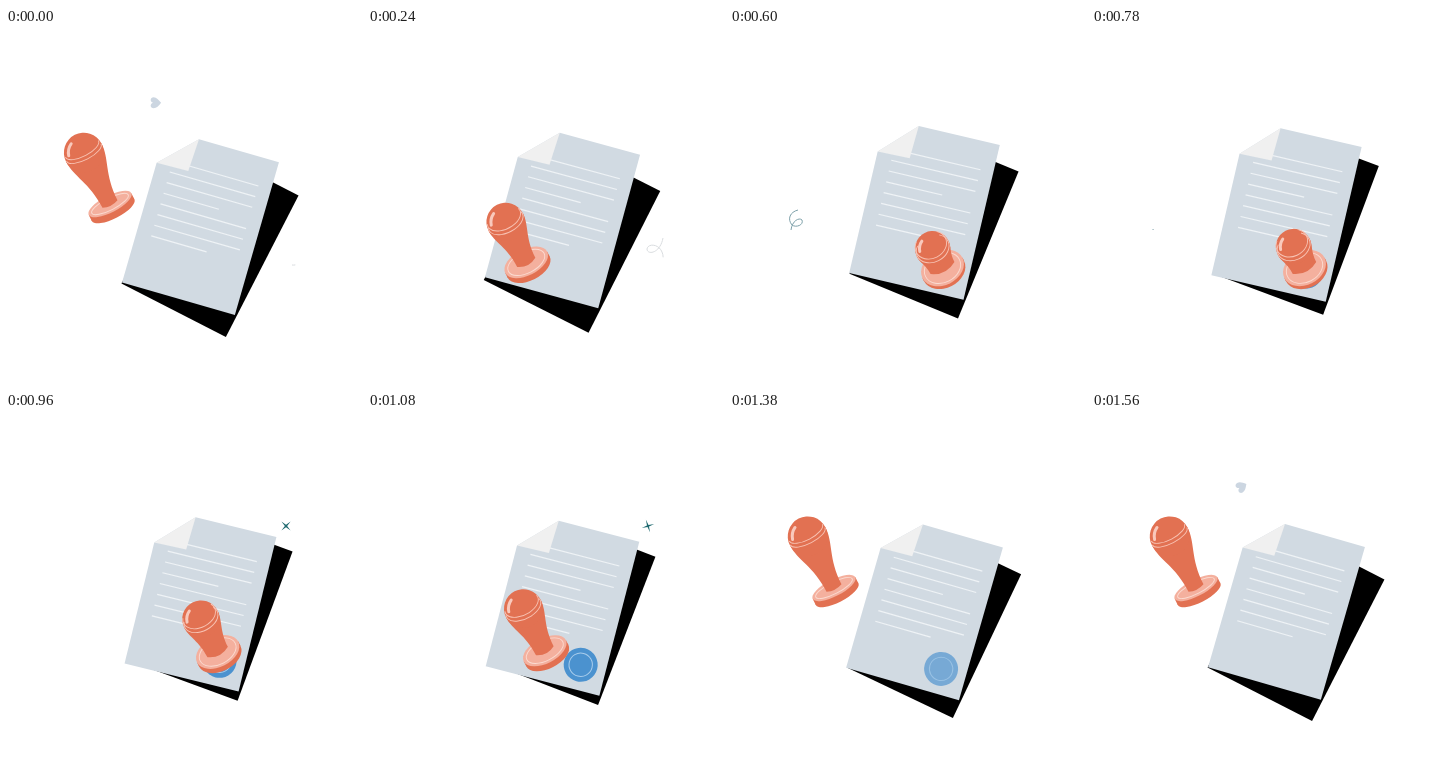
Write an HTML page with a canvas that moves like this. It is 356 px wide and 356 px high and loops after 1620 ms.

```html
<!DOCTYPE html>
<html lang="en">
<head>
<meta charset="utf-8">
<title>Stamping a document</title>
<style>
  html, body { margin: 0; height: 100%; overflow: hidden; background: #fff; }
  canvas { display: block; }
</style>
</head>
<body>
<canvas width="356" height="356"></canvas>
<script>
const ctx = document.querySelector('canvas').getContext('2d');
const LOOP = 1620, STEP = 60;
const ORANGE = '#e27152', SALMON = '#f4b09e', PALE = '#fbdbd1', PAPER = '#d1dae2';

const rad = deg => deg * Math.PI / 180;
const mix = (a, b, f) => a + (b - a) * f;
const ramp = (t, from, to) => Math.max(0, Math.min(1, (t - from) / (to - from)));
const ease = (t, from, to) => (1 - Math.cos(Math.PI * ramp(t, from, to))) / 2;

// Goes from 0 up to 1 at the peak and back to 0, once per loop; may begin before the loop does.
function swing(t, start, peak, end) {
  if (t > start + LOOP) t -= LOOP;
  return ease(t, start, peak) - ease(t, peak, end);
}

function local(x, y, angle, draw) {
  ctx.save();
  ctx.translate(x, y);
  ctx.rotate(angle);
  draw();
  ctx.restore();
}

function fill(color, path) {
  ctx.fillStyle = color;
  ctx.fill(path);
}

function stroke(color, width, path) {
  ctx.strokeStyle = color;
  ctx.lineWidth = width;
  ctx.stroke(path);
}

function ellipse(x, y, rx, ry, from = 0, to = 2 * Math.PI) {
  const p = new Path2D();
  p.ellipse(x, y, rx, ry, 0, from, to);
  return p;
}

const sheet = new Path2D('M-24.5-79.5H58.7V79.5H-58.7V-45.2Z');
const flap = new Path2D('M-24.5-79.5L-58.7-45.2L-26-46Z');
const lines = new Path2D();
for (let i = 0; i < 8; i++) {
  const y = -51 + 11.1 * i;
  lines.moveTo(-43.5, y);
  lines.lineTo(i % 4 === 3 ? 14 : 45.5, y);
}

function drawPaper(t) {
  const shadowY = mix(211.5, 191.8, swing(t, 0, 800, 1560));
  const shadowTilt = mix(27.2, 20.1, swing(t, 120, 900, LOOP));
  const y = mix(195.6, 181, swing(t, -140, 600, 1320));
  const tilt = mix(16.1, 13, swing(t, -20, 720, 1440));

  local(204, shadowY, rad(shadowTilt), () => fill('#000', sheet));
  local(194.5, y, rad(tilt), () => {
    fill(PAPER, sheet);
    ctx.save();
    ctx.clip(sheet);
    stroke('#eff3f6', 1.2, lines);
    ctx.restore();
    fill('#f0f0f0', flap);
    if (t < 660) return;
    ctx.globalAlpha = 1 - ramp(t, 1320, 1500);
    fill('#4b92cf', ellipse(32.9, 54.3, 17, 17));
    stroke('#a9cdec', 1, ellipse(32.9, 54.3, 11.7, 11.7));
  });
}

function drawStamp(t) {
  const travel = ease(t, 60, 420) - ease(t, 940, 1300);
  const x = mix(104, 212.5, travel);
  const y = mix(176, 240, 1 - (1 - travel) ** 3.5);
  const len = mix(58, 21, swing(t, -40, 660, 1320));
  const open = Math.sqrt(1 - (len / 63) ** 2);   // how far the discs face the viewer
  const rx = 24 - 2 * open ** 4, ry = 2 + 16 * open, thick = 1 + len * 0.1;
  const head = 20 - 3 * open ** 4, neck = 8 + 6.5 * open ** 3;

  local(x, y, rad(-27), () => {
    fill(ORANGE, ellipse(0, thick, rx, ry));
    ctx.fillRect(-rx, 0, 2 * rx, thick);
    fill(SALMON, ellipse(0, 0, rx, ry));
    stroke(PALE, 0.9, ellipse(0, 0, rx - 3.5, ry - 2.5));

    fill(ORANGE, new Path2D(
      `M${-head} ${-len}C${-head} ${-len * 0.7} ${-neck} ${-len * 0.5} ${-neck} 0` +
      `Q0 ${9 * open} ${neck} 0C${neck} ${-len * 0.5} ${head} ${-len * 0.7} ${head} ${-len}Z`));
    fill(ORANGE, ellipse(0, -len, head, head));

    const wrap = open ** 4;
    for (const shift of [4, 0])
      stroke('#f8c3b4', 0.9,
        ellipse(0, -len - shift, head - 0.6 - shift / 5, 3 + 11 * open, -wrap, Math.PI + wrap));

    ctx.lineCap = 'round';
    stroke('#f9c9bc', 3, ellipse(0, -len, head - 4.5, head - 4.5, rad(195), rad(242)));
  });
}

// Draws the part of a path between two fractions of its length.
function drawTrim(path, length, from, to, color) {
  if (to <= from) return;
  ctx.save();
  ctx.setLineDash([length * (to - from), 999]);
  ctx.lineDashOffset = -length * from;
  stroke(color, 1, path);
  ctx.restore();
}

const curlRight = new Path2D('M286 237C294 238 297 231 294 224C291 216 280 215 279 221C279 227 292 226 295 210');
const curlLeft = new Path2D('M68 182C60 184 57 191 62 197C66 200 74 197 72 192C69 189 62 193 61 202');
const star = new Path2D('M0-6.5L.8-.8L6.5 0L.8 .8L0 6.5L-.8 .8L-6.5 0L-.8-.8Z');
const heart = new Path2D('M0 5.5C-3 3-5.5 1-5.5-2C-5.5-5.5-1-6 0-2.5C1-6 5.5-5.5 5.5-2C5.5 1 3 3 0 5.5Z');

// Draws a small shape that grows, spins and shrinks away.
function drawSpark(path, x, y, angle, size, color) {
  if (size <= 0) return;
  local(x, y, rad(angle), () => {
    ctx.scale(size, size);
    fill(color, path);
  });
}

function drawSparks(t) {
  drawTrim(curlRight, 66, ramp(t, 205, 375), ramp(t, -10, 200), '#d9dcdf');
  drawTrim(curlLeft, 57, ramp(t, 620, 800), ramp(t, 420, 600), '#7da0a9');
  drawSpark(star, 280, 114, 45 + (t - 960) * 0.22,
    ramp(t, 800, 920) - ramp(t, 1200, 1380), t < 1100 ? '#1f6a70' : '#587f95');
  const h = t < 600 ? t : t - LOOP;
  drawSpark(heart, 149.6, 74.7, h / 2 - 90, ramp(h, -240, -100) - ramp(h, 20, 180), '#ccd6e1');
}

function frame(now) {
  const t = Math.floor(now % LOOP / STEP) * STEP;
  ctx.clearRect(0, 0, 356, 356);
  drawPaper(t);
  drawStamp(t);
  drawSparks(t);
  requestAnimationFrame(frame);
}
frame(0);
</script>
</body>
</html>
```
